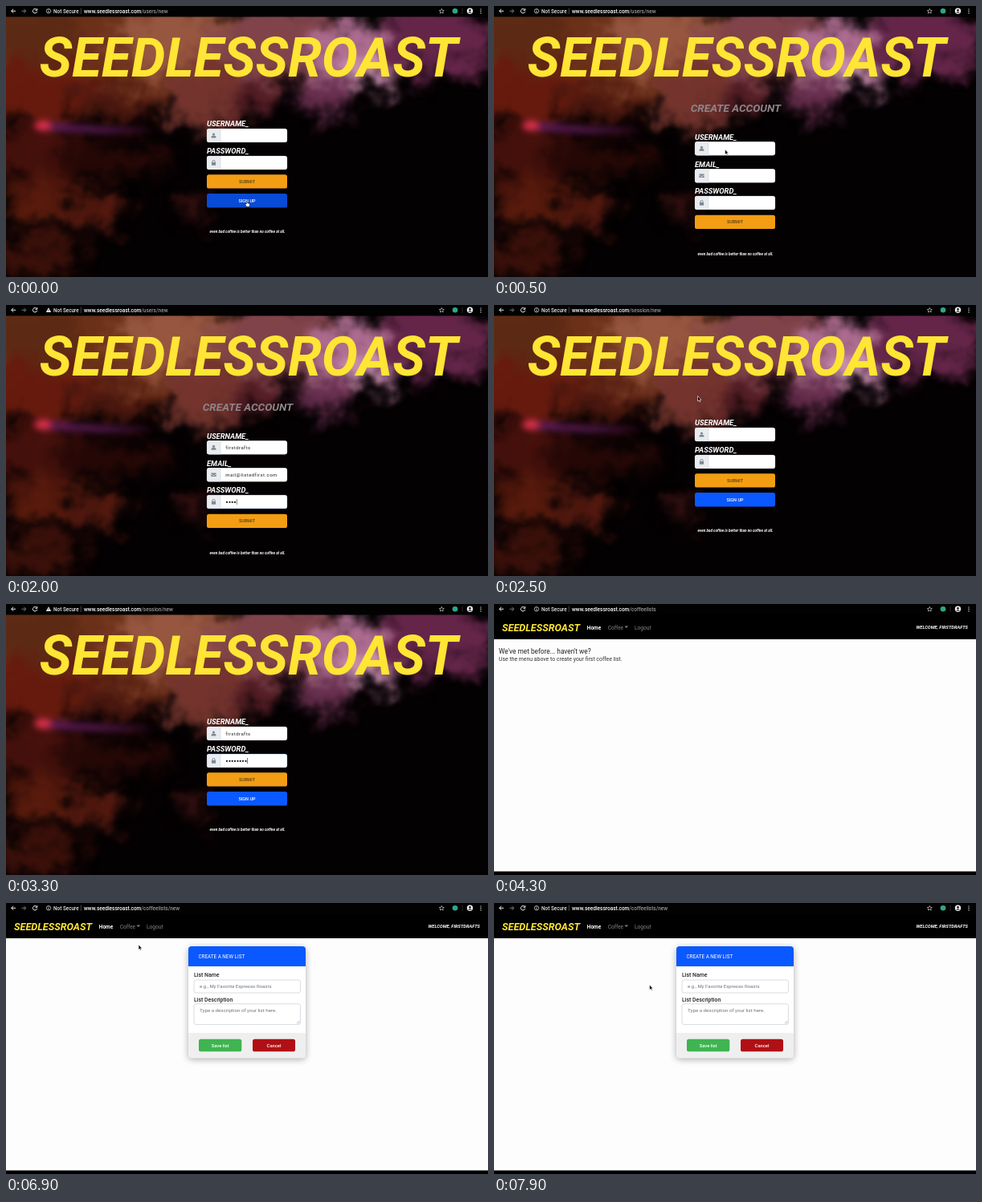
Recreate the animation shown at these times as an HTML page. Size 600 by 338 pixels, loop 8000 ms.

```html
<!DOCTYPE html>
<html lang="en">
<head>
<meta charset="utf-8">
<title>Coffee list sign-up</title>
<style>
html, body { margin: 0; width: 100%; height: 100%; overflow: hidden; background: #000; }
svg { display: block; width: 100vw; height: 100vh; }
text { font-family: Roboto, "Liberation Sans", sans-serif; white-space: pre; }
filter { color-interpolation-filters: sRGB; }
.b { font-weight: 700; }
.i { font-weight: 700; font-style: italic; }
.m { font-weight: 500; }
.typed { letter-spacing: .45px; }
</style>
</head>
<body>
<svg id="stage" viewBox="0 0 600 338" preserveAspectRatio="none"></svg>
<script>
const BRAND = 'SEEDLESSROAST', USER = 'firstdrafts', MAIL = 'mail@listedfirst.com';
const HOST = `www.${BRAND.toLowerCase()}.com`;

const text = (x, y, size, fill, str, cls = '', anchor = 'start', id = '') =>
  `<text x="${x}" y="${y}" font-size="${size}" fill="${fill}" class="${cls}" text-anchor="${anchor}" id="${id}">${str}</text>`;
const rect = (x, y, w, h, fill, rx = 0, more = '') =>
  `<rect x="${x}" y="${y}" width="${w}" height="${h}" fill="${fill}" rx="${rx}" ${more}/>`;
const group = (id, body) => `<g id="${id}">${body}</g>`;

const icons = {
  user: '<circle cy="-1.5" r="1.6"/><path d="M-3 3V2Q-3 .3 -1 .3H1Q3 .3 3 2V3Z"/>',
  mail: '<path d="M-3.2 -2.3H3.2V-1.3L0 .7L-3.2 -1.3ZM-3.2 -.5L0 1.5L3.2 -.5V2.4H-3.2Z"/>',
  lock: '<rect x="-2.6" y="-.4" width="5.2" height="3.6" rx=".6"/><path d="M-1.6 0V-1.4A1.6 1.6 0 0 1 1.6 -1.4V0" fill="none" stroke="#7d8894"/>'
};

function field(label, y, icon, id) {
  const secret = icon == 'lock';
  return text(250, y - 2.6, 9.4, '#fff', label, 'i') +
    rect(250, y, 100, 17, '#fff', 2.8) +
    `<path d="M267 ${y}H252.8Q250 ${y} 250 ${y + 2.8}V${y + 14.2}Q250 ${y + 17} 252.8 ${y + 17}H267Z" fill="#e9ecef"/>` +
    rect(250.3, y + .3, 99.4, 16.4, 'none', 2.6, `id="${id}Ring" stroke="#e2e5ea" stroke-width=".5"`) +
    `<path d="M267 ${y}v17" stroke="#ced4da" stroke-width=".6"/>` +
    `<g transform="translate(258.5 ${y + 8.5})" fill="#7d8894">${icons[icon]}</g>` +
    text(273.3, y + (secret ? 11.8 : 10.8), secret ? 9.3 : 6, '#222', '', secret ? 'b' : 'typed', 'start', id) +
    rect(0, y + 5, .6, 7, '#222', 0, `id="${id}Caret"`);
}

const button = (x, y, w, h, fill, str, color, size, id = '') =>
  rect(x, y, w, h, fill, 2.6, `id="${id}"`) + text(x + w / 2, y + h / 2 + size * .36, size, color, str, 'm', 'middle');
const motto = y => text(300.5, y, 4.7, '#fff', 'even bad coffee is better than no coffee at all.', 'i', 'middle');

// Soft photo backdrop: x, y, rx, ry, colour
const blobs = [
  [120, 50, 190, 75, '#6b3018'], [30, 40, 60, 40, '#5c2a14'], [215, 45, 75, 50, '#96563f'],
  [245, 110, 48, 45, '#74342d'], [340, 45, 80, 50, '#80434a'], [310, 110, 30, 24, '#521c24'],
  [435, 60, 55, 45, '#ad6c90'], [445, 82, 22, 20, '#cb94b2'], [400, 112, 30, 22, '#6a2f50'],
  [540, 42, 75, 42, '#642549'], [45, 110, 75, 40, '#661a0d'], [130, 120, 55, 24, '#4d180f'],
  [40, 185, 65, 35, '#45100b'], [130, 190, 70, 24, '#260806'], [45, 245, 50, 25, '#581a0c'],
  [115, 255, 32, 22, '#55190f'], [235, 252, 15, 11, '#561a18'], [40, 310, 60, 24, '#3c100a']
].map(([x, y, rx, ry, c]) => `<ellipse cx="${x}" cy="${y}" rx="${rx}" ry="${ry}" fill="${c}"/>`).join('');

const photo = rect(0, 0, 600, 338, '#040102') + `<g filter="url(#soft)">${blobs}</g>` +
  `<g filter="url(#glow)"><path d="M38 143L100 150L188 155L120 158L40 155Z" fill="#5d1b58"/>
   <ellipse cx="46" cy="149" rx="11" ry="6" fill="#e0324e"/></g>` +
  text(302, 88.3, 67.5, '#ffe534', BRAND, 'i', 'middle');

const login = field('USERNAME_', 153, 'user', 'name') + field('PASSWORD_', 187, 'lock', 'pass') +
  button(250, 210.3, 100, 17.2, '#f29d13', 'SUBMIT', '#5c4012', 5.5) +
  button(250, 234, 100, 17.5, '#0a58ff', 'SIGN UP', '#fff', 5.5, 'signup') + motto(283.4);

const create = text(301, 132.4, 13.6, '#8d8589', 'CREATE ACCOUNT', 'i', 'middle') +
  field('USERNAME_', 169.3, 'user', 'newName') + field('EMAIL_', 203.2, 'mail', 'newMail') +
  field('PASSWORD_', 237, 'lock', 'newPass') +
  button(250, 260.8, 100, 17.2, '#f29d13', 'SUBMIT', '#5c4012', 5.5) + motto(311.3);

const shell = rect(0, 0, 600, 338, '#fdfdfd') + rect(0, 0, 600, 44, '#000') + rect(0, 333.5, 600, 5, '#000') +
  text(10, 33.8, 12.6, '#ffe534', BRAND, 'i') + text(115.8, 31.5, 6.5, '#fff', 'Home', 'b') +
  text(141.8, 31.5, 6.5, '#858585', 'Coffee') + '<path d="M162.5 27.6H167L164.7 30Z" fill="#858585"/>' +
  text(175, 31.5, 6.6, '#858585', 'Logout') +
  text(590, 31.4, 5.7, '#fff', `WELCOME, ${USER.toUpperCase()}`, 'i', 'end');

const welcome = text(6, 61.5, 8.3, '#222', "We've met before... haven't we?") +
  text(6, 71.4, 6.9, '#333', 'Use the menu above to create your first coffee list.');

const box = (y, h) => rect(234, y, 132.5, h, '#fff', 2.5, 'stroke="#ced4da" stroke-width=".8"');
const modal = rect(227, 56, 146, 139, '#000', 4, 'opacity=".32" filter="url(#shade)"') +
  rect(227, 54, 146, 139.5, '#efefef', 4) + rect(227, 54, 146, 30, '#0a58ff', 4) +
  rect(227, 79, 146, 83, '#fff') +
  text(239.5, 69, 6.3, '#fff', 'CREATE A NEW LIST') +
  text(234, 92.4, 6.9, '#222', 'List Name', 'm') + box(96, 16) +
  text(241, 106.2, 6, '#6c757d', 'e.g., My Favorite Espresso Roasts') +
  text(234, 122.7, 6.9, '#222', 'List Description', 'm') + box(125.8, 25.7) +
  text(241, 136, 6.2, '#6c757d', 'Type a description of your list here.') +
  '<path d="M362 150.3L365.4 147M364 150.3L365.4 149" stroke="#777" stroke-width=".5"/>' +
  button(240, 169.7, 53.3, 15.6, '#3fb450', 'Save list', '#fff', 5.8) +
  button(307, 169.7, 53, 15.6, '#b01015', 'Cancel', '#fff', 5.8);

const browser = rect(0, 0, 600, 13.5, '#020202') +
  `<g fill="none" stroke="#eee" stroke-width="1">
   <path d="M12 6.3H6.8M9.2 3.8L6.7 6.3L9.2 8.8"/>
   <path d="M19.5 6.3H24.7M22.3 3.8L24.8 6.3L22.3 8.8" stroke="#777"/>
   <path d="M38.2 4.6A2.7 2.7 0 1 0 38.7 6.9M38.8 3.2V5.4H36.6"/>
   <g id="info"><circle cx="53" cy="6.3" r="2.7" stroke-width=".7"/><path d="M53 5.8V8M53 4.4V5.2" stroke-width=".8"/></g>
   <g id="warn"><path d="M53 3.3L56.2 9H49.8Z" fill="#eee" stroke="none"/><path d="M53 5.2V7M53 7.5V8.2" stroke="#000" stroke-width=".6"/></g>
   <path d="M93.3 2.5V10" stroke="#777" stroke-width=".6"/>
   <path d="M542.3 3.4L543.2 5.4L545.3 5.6L543.7 7L544.2 9L542.3 8L540.4 9L540.9 7L539.3 5.6L541.4 5.4Z" stroke-width=".6"/>
   <path d="M568 2.5V10" stroke="#555" stroke-width=".5"/></g>
   <circle cx="559" cy="6.3" r="3.3" fill="#2ba88b"/>
   <circle cx="577.5" cy="6.3" r="3.7" fill="#eee"/><circle cx="577.5" cy="5.2" r="1.2"/><path d="M575.2 8.5Q577.5 5.9 579.8 8.5Z"/>
   <path d="M590.4 3.4h1.2v1.2h-1.2zM590.4 5.8h1.2V7h-1.2zM590.4 8.2h1.2v1.2h-1.2z" fill="#eee"/>` +
  text(59, 8.7, 6.4, '#e8e8e8', 'Not Secure', 'm') +
  `<text x="97" y="8.7" font-size="6.5" fill="#fff" class="m">${HOST}<tspan id="path" fill="#999"></tspan></text>`;

const pointers =
  group('arrow', '<path d="M0 0V6.4L1.5 5.1L2.5 7.3L3.5 6.8L2.5 4.7H4.5Z" fill="#000" stroke="#fff" stroke-width=".6"/>') +
  group('hand', '<path d="M-.7 4V.6Q0 -.5 .7 .6V2.8L3 3.4Q3.7 3.7 3.5 4.6L2.9 7.3H-.5L-2.3 4.6Q-2 3.6 -.7 4Z" fill="#fff" stroke="#000" stroke-width=".5"/>');

const stage = document.getElementById('stage');
stage.innerHTML = `<defs>
  <filter id="soft" filterUnits="userSpaceOnUse" x="-60" y="-60" width="720" height="460">
    <feGaussianBlur stdDeviation="11" result="blur"/>
    <feTurbulence type="fractalNoise" baseFrequency=".03" numOctaves="3" seed="4"/>
    <feDisplacementMap in="blur" scale="60" xChannelSelector="R" yChannelSelector="G"/>
  </filter>
  <filter id="glow" x="-20%" y="-100%" width="140%" height="300%"><feGaussianBlur stdDeviation="4"/></filter>
  <filter id="shade" x="-20%" y="-20%" width="140%" height="140%"><feGaussianBlur stdDeviation="4.5"/></filter></defs>` +
  group('photo', photo) + group('login', login) + group('create', create) + group('shell', shell) +
  group('welcome', welcome) + group('modal', modal) + browser + pointers;

const el = id => document.getElementById(id);
const show = (id, on) => el(id).setAttribute('display', on ? 'inline' : 'none');

// Fills a field between two times; the caret stays until the focus moves on
function type(id, str, t, from, to, blur) {
  const part = Math.max(0, Math.min(1, (t - from) / (to - from)));
  const node = el(id), focus = t >= from - 60 && t < blur;
  node.textContent = str.slice(0, Math.floor(part * str.length + 1e-6));
  show(id + 'Caret', focus);
  el(id + 'Ring').setAttribute('stroke', focus ? '#a9cdff' : '#e2e5ea');
  if (focus) el(id + 'Caret').setAttribute('x', 273.5 + node.getComputedTextLength());
}

// Pointer stops: time, x, y; hidden while typing
const stops = [[0, 300, 243], [150, 300, 243], [550, 287, 176], [2200, 287, 176], [2500, 253.5, 113.5],
  [2650, 287, 161], [5000, 287, 161], [5800, 155.5, 63], [6150, 153, 29], [6400, 153, 29],
  [6700, 165, 52], [7000, 165, 52], [7900, 193.5, 102], [8000, 193.5, 102]];

function pointer(t) {
  const n = stops.findIndex(s => s[0] > t), [t0, x0, y0] = stops[n - 1], [t1, x1, y1] = stops[n];
  const k = (t - t0) / (t1 - t0), e = k * k * (3 - 2 * k);
  const at = `translate(${x0 + (x1 - x0) * e} ${y0 + (y1 - y0) * e})`;
  const hidden = t >= 650 && t < 2250 || t >= 2700 && t < 5000;
  const hand = t < 200 || t >= 6050 && t < 6900;
  for (const id of ['arrow', 'hand']) {
    el(id).setAttribute('transform', at);
    show(id, !hidden && hand == (id == 'hand'));
  }
}

function draw(t) {
  const page = t < 100 ? 'login' : t < 2300 ? 'create' : t < 3500 ? 'login' : t < 6900 ? 'welcome' : 'modal';
  for (const id of ['login', 'create', 'welcome', 'modal']) show(id, id == page);
  show('photo', t < 3500);
  show('shell', t >= 3500);
  // The address bar warns once a form has been edited
  const edited = t >= 700 && t < 2300 || t >= 2800 && t < 3500;
  show('warn', edited);
  show('info', !edited);
  el('path').textContent = t < 2300 ? '/users/new' : t < 3500 ? '/session/new' : t < 6900 ? '/coffeelists' : '/coffeelists/new';
  el('signup').setAttribute('fill', t < 100 ? '#084bd6' : '#0a58ff');
  type('newName', USER, t, 600, 1200, 1200);
  type('newMail', MAIL, t, 1200, 1700, 1750);
  type('newPass', '•'.repeat(8), t, 1800, 2200, 2300);
  type('name', USER, t, 2700, 3000, 3000);
  type('pass', '•'.repeat(8), t, 3000, 3300, 3500);
  pointer(t);
}

const start = performance.now();
let last = -1;
function tick() {
  const t = Math.floor((performance.now() - start) % 8000 / 100) * 100;
  if (t != last) draw(last = t);
  requestAnimationFrame(tick);
}
tick();
</script>
</body>
</html>
```
